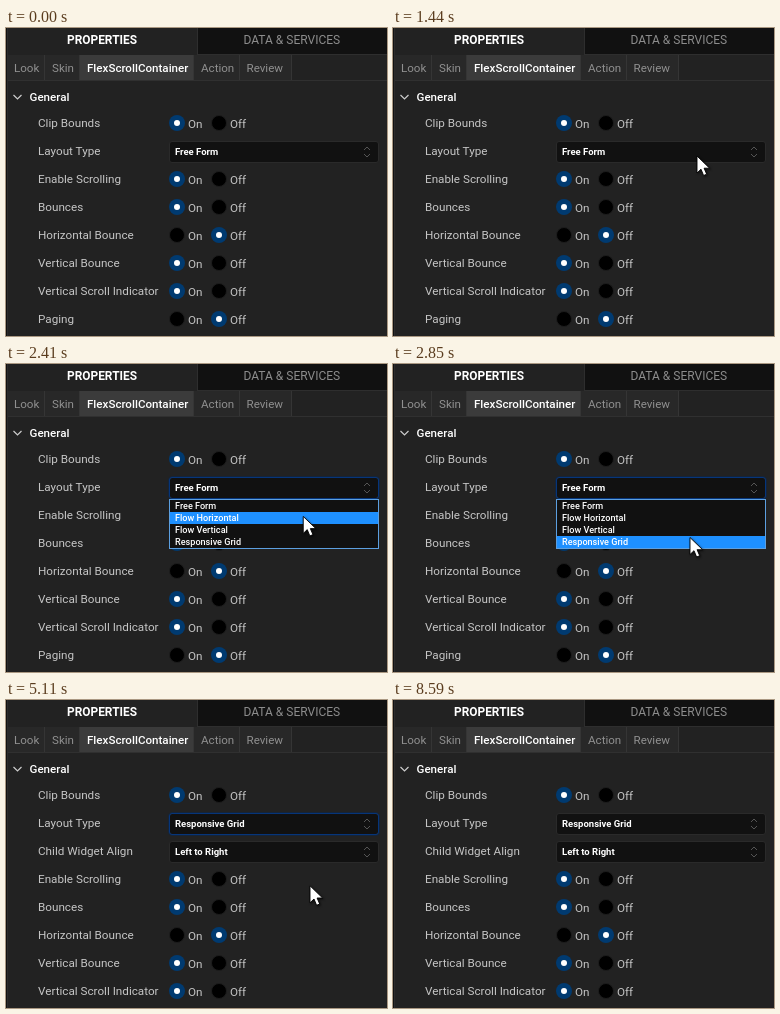
These frames come from a looping animation (381 px wide and 308 px high, 8.65 s). An HTML page:

```html
<!DOCTYPE html>
<html lang="en">
<head>
<meta charset="utf-8">
<title>Properties panel</title>
<style>
  html, body { margin: 0; width: 100%; height: 100%; overflow: hidden; background: #222; }
  svg { display: block; width: 381px; height: 308px; }
  text { font: 11.7px Roboto, sans-serif; fill: #c6c6c6; white-space: pre; }
  .head { font-size: 12px; fill: #8c8c8c; }
  .tab { font-size: 11.6px; fill: #909090; }
  .strong { font-size: 11.6px; font-weight: 500; fill: #fff; }
  .head.strong { font-size: 11.9px; font-weight: 700; }
  .value { font-size: 9.5px; font-weight: 700; fill: #fff; }
  .option { font-size: 9.1px; font-weight: 500; fill: #fff; }
  .arrows { fill: none; stroke: #555; }
  #cursor { filter: drop-shadow(1px 1px 1px #0009); }
</style>
</head>
<body>
<svg id="stage" viewBox="0 0 381 308">
  <g id="panel"></g>
  <g id="before"></g>
  <g id="after"></g>
  <g id="focus" fill="none">
    <rect x="162.5" y="112.5" width="211" height="23" rx="3.5" stroke="#14243a"/>
    <rect x="163.5" y="113.5" width="209" height="21" rx="2.5" stroke="#06357a"/>
  </g>
  <g id="list"></g>
  <path id="cursor" d="M0 0V17L4 13.2L6.6 19.5L9.7 18.2L7.1 12.2H12.6Z" fill="#fff" stroke="#000" stroke-width=".9"/>
</svg>
<script>
const LOOP = 8650, STEP = 60, ROW = 28;
const OPEN = 1900, CHOOSE = 3710, BLUR = 8590;
const OPTIONS = ['Free Form', 'Flow Horizontal', 'Flow Vertical', 'Responsive Grid'];
const RADIOS = [
  ['Enable Scrolling', true], ['Bounces', true], ['Horizontal Bounce', false],
  ['Vertical Bounce', true], ['Vertical Scroll Indicator', true], ['Paging', false]
];
// Pointer moves along quadratic curves, in steps of 60 ms
const MOVES = [
  { start: 660, steps: 14, from: [49, 300], via: [180, 215], to: [304, 128], ease: p => p * p * (3 - 2 * p) },
  { start: 2230, steps: 5, from: [304, 128], via: [300, 140], to: [297, 153.5], ease: p => p * (2 - p) },
  { start: 2730, steps: 3, from: [297, 153.5], via: [297, 163], to: [297, 173.5], ease: p => p },
  { start: 5110, steps: 8, from: [297, 173.5], via: [330, 220], to: [283, 310], ease: p => p }
];
const SHOW = MOVES[0].start, HIDE = 5530;

const $ = id => document.getElementById(id);
const text = (x, y, s, cls = '') => `<text x="${x}" y="${y}" class="${cls}">${s.replace('&', '&amp;')}</text>`;
const rect = (x, y, w, h, fill, extra = '') => `<rect x="${x}" y="${y}" width="${w}" height="${h}" fill="${fill}" ${extra}/>`;
const label = (y, s) => text(32, y + 4, s);

const radio = (x, y, on, s) => (on
  ? `<circle cx="${x}" cy="${y}" r="8" fill="#003a70"/><circle cx="${x}" cy="${y}" r="3" fill="#fff"/>`
  : `<circle cx="${x}" cy="${y}" r="7.5" stroke="#1c1c1c"/>`) + text(x + 11, y + 5, s);

const radioRow = (y, s, on) => label(y, s) + radio(171, y, on, 'On') + radio(213, y, !on, 'Off');

const selectRow = (y, s, value) => label(y, s) +
  rect(163.5, y - 9.5, 209, 21, '#111', 'rx="2.5" stroke="#2a2a2a"') +
  text(169, y + 4, value, 'value') +
  `<path class="arrows" d="M358 ${y - 1}l3-3l3 3M358 ${y + 3}l3 3l3-3"/>`;

const radioRows = top => RADIOS.map(([s, on], i) => radioRow(top + i * ROW, s, on)).join('');

$('panel').innerHTML =
  rect(191, 0, 190, 26, '#111') + rect(191, 26, 190, 1, '#2e2e2e') + rect(191, 0, 1, 26, '#2e2e2e') +
  text(61, 16, 'PROPERTIES', 'head strong') + text(237.5, 16, 'DATA & SERVICES', 'head') +
  rect(1, 27, 285, 25, '#282828') + rect(74, 27, 113, 25, '#3b3b3b') +
  [38, 73, 187, 233, 285].map(x => rect(x, 27, 1, 25, '#353535')).join('') +
  rect(0, 52, 381, 1, '#303030') + rect(0, 0, 1, 308, '#111') + rect(1, 0, 1, 308, '#2c2c2c') +
  text(8, 44, 'Look', 'tab') + text(46, 44, 'Skin', 'tab') +
  text(81, 44, 'FlexScrollContainer', 'strong') +
  text(195, 44, 'Action', 'tab') + text(240.5, 44, 'Review', 'tab') +
  '<path d="M7.5 67l4 4l4-4" fill="none" stroke="#ccc" stroke-width="1.2"/>' +
  text(23.5, 73, 'General', 'strong') + radioRow(95, 'Clip Bounds', true);

$('before').innerHTML = selectRow(123, 'Layout Type', OPTIONS[0]) + radioRows(151);
$('after').innerHTML = selectRow(123, 'Layout Type', OPTIONS[3]) +
  selectRow(151, 'Child Widget Align', 'Left to Right') + radioRows(179);

$('list').innerHTML =
  rect(163.5, 135.5, 209, 49, '#111', 'stroke="#5c9fe0"') +
  rect(164, 136, 208, 12, '#1e90ff', 'id="highlight"') +
  OPTIONS.map((s, i) => text(169, 145 + i * 12, s, 'option')).join('');

function pointerAt(t) {
  const move = MOVES.findLast(m => t >= m.start) || MOVES[0];
  const step = Math.min(move.steps, Math.max(0, Math.floor((t - move.start) / STEP) + 1));
  const p = move.ease(step / move.steps), q = 1 - p;
  return move.from.map((a, i) => q * q * a + 2 * p * q * move.via[i] + p * p * move.to[i]);
}

const show = (id, visible) => $(id).setAttribute('visibility', visible ? 'visible' : 'hidden');

function draw() {
  const t = performance.now() % LOOP;
  const [x, y] = pointerAt(t);
  const row = Math.min(3, Math.max(0, Math.floor((y - 136) / 12)));
  show('before', t < CHOOSE);
  show('after', t >= CHOOSE);
  show('focus', t >= OPEN && t < BLUR);
  show('list', t >= OPEN && t < CHOOSE);
  show('cursor', t >= SHOW && t < HIDE);
  $('highlight').setAttribute('y', 136 + row * 12);
  $('cursor').setAttribute('transform', `translate(${x} ${y})`);
  requestAnimationFrame(draw);
}
draw();
</script>
</body>
</html>
```
